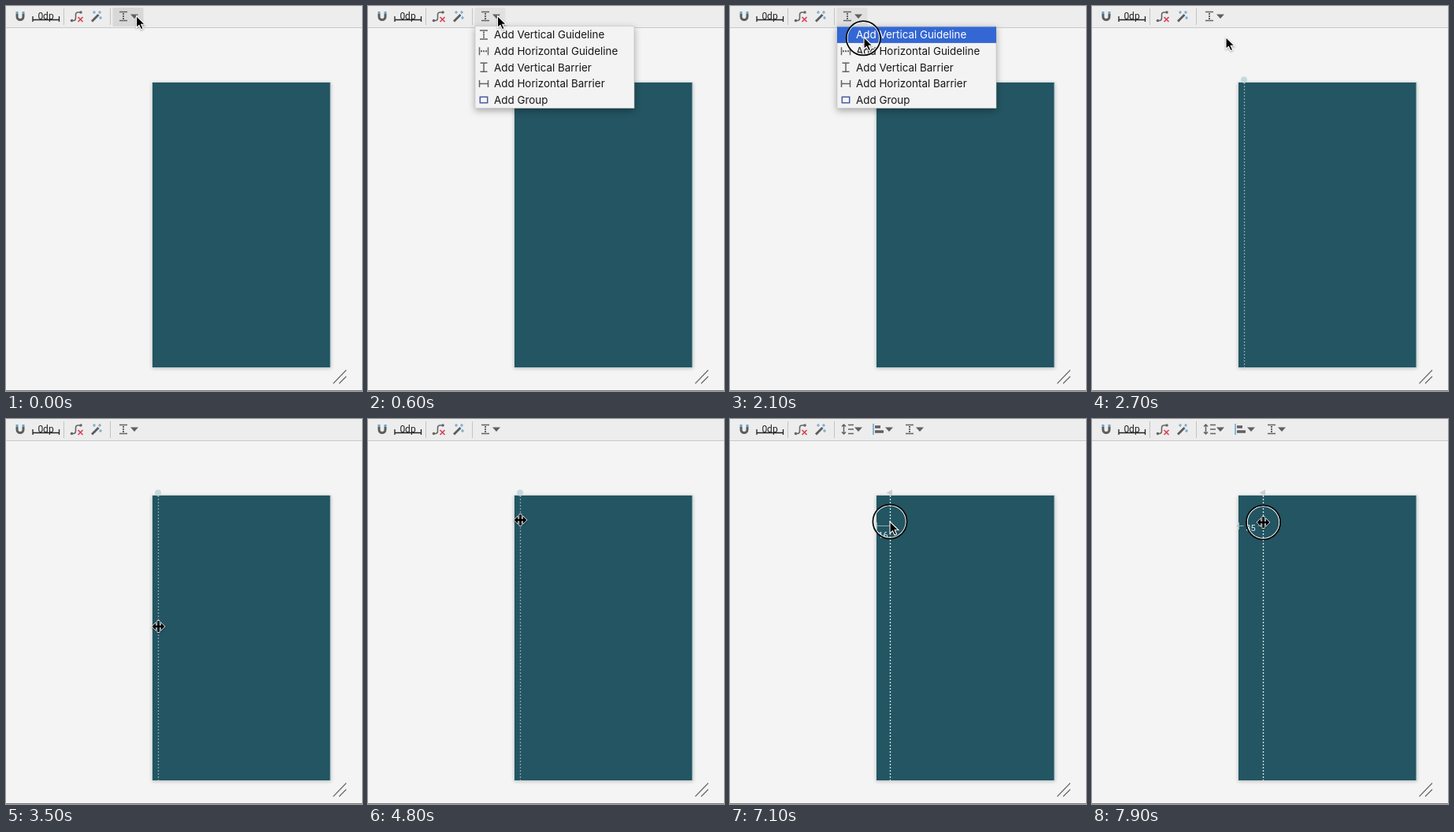
An HTML page that plays this animation: 452 px wide and 488 px high, repeating every 8 s.

```html
<!DOCTYPE html>
<html lang="en">
<head>
<meta charset="utf-8">
<title>Adding a vertical guideline</title>
<style>
  html, body { margin: 0; width: 100%; height: 100%; overflow: hidden; background: #f4f4f4; }
  svg { display: block; width: 452px; height: 488px; }
  .dp { font: 12px Roboto, sans-serif; fill: #222; }
  .item { font: 13.4px Inter, sans-serif; fill: #161616; }
  .on { fill: #fff; }
  #value { font: 11px Roboto, sans-serif; fill: #e3ecee; }
  .shade { filter: drop-shadow(0 3px 4px rgba(0, 0, 0, .32)); }
  .ink { fill: none; stroke: #636363; stroke-width: 1.5; }
</style>
</head>
<body>
<svg viewBox="0 0 452 488">
  <defs>
    <path id="tri" d="M-5 -2.6H5L0 3Z" fill="#606060"/>
    <g id="vguide" class="ink">
      <path d="M-5 -5.5H5M-5 5.5H5"/>
      <path d="M0 -4V4" stroke-width="2" stroke-dasharray="2 1"/>
    </g>
    <g id="vbar" class="ink"><path d="M-4.5 -5.5H4.5M-4.5 5.5H4.5M0 -5V5"/></g>
    <g id="group"><rect x="-4.7" y="-3.7" width="9.4" height="7.4" fill="#f4f6fc" stroke="#4a5a9c" stroke-width="1.5"/></g>
  </defs>

  <rect width="452" height="488" fill="#f4f4f4"/>
  <rect width="452" height="27" fill="#ededed"/>
  <path d="M0 27.5H452" stroke="#c9c9c9"/>
  <path d="M0 487.5H452" stroke="#777"/>

  <!-- toolbar -->
  <rect id="button" x="135.5" y="2" width="39" height="24" rx="1.5"/>
  <path d="M14 10V13.5a4 4 0 0 0 8 0V10" fill="none" stroke="#5d5d5d" stroke-width="3"/>
  <path d="M14 7V10M22 7V10" stroke="#62a5cf" stroke-width="3"/>
  <text class="dp" x="50.5" y="16.5" text-anchor="middle">0dp</text>
  <path d="M34 13V20M67.5 13V20M34 17.5H67.5" fill="none" stroke="#222" stroke-width="1.3"/>
  <path d="M73.5 3V24M132.5 3V24" stroke="#c3c3c3"/>
  <path d="M82 18.5H85.5Q88.5 18.5 88.5 15V11Q88.5 8 91.5 8H96" fill="none" stroke="#666" stroke-width="1.6"/>
  <circle cx="83.5" cy="18.5" r="1.8" fill="#666"/><circle cx="95" cy="8" r="1.8" fill="#666"/>
  <path d="M91.5 14L97.5 20M97.5 14L91.5 20" stroke="#dd4055" stroke-width="1.7"/>
  <path d="M109 19.5L117.5 11" stroke="#5d5d5d" stroke-width="2.8"/>
  <path d="M112 6V10M110 8H114M120 13V17M118 15H122M119 6V10M117 8H121" stroke="#6aa3cc" stroke-width="1.2"/>
  <g id="basic">
    <use href="#vguide" x="149" y="13"/><use href="#tri" x="163" y="13"/>
  </g>
  <g id="extra">
    <path class="ink" d="M150 7.5H157M150 13H157M150 18.5H157M144.5 7V19M142 9.5L144.5 7L147 9.5M142 16.5L144.5 19L147 16.5"/>
    <use href="#tri" x="163" y="13"/>
    <path d="M182 6V20" stroke="#65a5cc" stroke-width="1.5"/>
    <path d="M184 10H191M184 16H195" stroke="#606060" stroke-width="3.6"/>
    <use href="#tri" x="202" y="13"/>
    <use href="#vguide" x="228" y="13"/><use href="#tri" x="241" y="13"/>
  </g>

  <!-- blueprint -->
  <rect x="185.5" y="96.5" width="227" height="362" fill="#bfd6da" style="filter:drop-shadow(0 1px 2px rgba(0,0,0,.22))"/>
  <rect x="186" y="97" width="225.5" height="361" fill="#235562"/>
  <path d="M415.5 478.5L432 461.5M423 478.5L432 469.5" stroke="#666" stroke-width="1.1"/>

  <g id="guide">
    <path id="line" d="M.5 97V458" stroke-width="1.3" stroke-dasharray="2 2"/>
    <circle id="knob" cy="93.5" r="4" fill="#c6dadd"/>
    <path id="arrow" d="M-4.5 93.5L3 89.5V97Z" fill="#cbcfd0"/>
  </g>
  <g id="measure">
    <path id="span" fill="none" stroke="#8fb0ad" stroke-width="1"/>
    <text id="value" text-anchor="middle"></text>
  </g>

  <g id="menu">
    <rect class="shade" x="136" y="25.5" width="202" height="104" fill="#f3f3f3" stroke="#c4c4c4" stroke-width=".6"/>
    <rect id="mark" x="136" width="202" height="20.6" fill="#3467d3"/>
    <g id="rows"></g>
  </g>

  <!-- pointers -->
  <g id="ring" fill="none">
    <circle r="20.4" stroke="#fff" stroke-width="1.3"/>
    <circle r="21.6" stroke="#080808" stroke-width="1.8"/>
  </g>
  <path id="pointer" d="M0 0V15L3.5 11.8L6 17.2L8.6 16L6.2 10.8H11Z" fill="#000" stroke="#fff" stroke-width="1.1"
    style="filter:drop-shadow(0 1px 1px rgba(0,0,0,.35))"/>
  <path id="resize" d="M-8 0L-3.5 -4.5V-1.5H-1.2V-7H1.2V-1.5H3.5V-4.5L8 0L3.5 4.5V1.5H1.2V7H-1.2V1.5H-3.5V4.5Z"
    fill="#000" stroke="#fff" stroke-width="1.3" style="paint-order:stroke;filter:drop-shadow(0 1px 1px rgba(0,0,0,.35))"/>
</svg>
<script>
const LOOP = 8000, STEP = 100;
const ROW_TOP = 26.3, ROW_H = 20.6, EDGE = 186;
const el = id => document.getElementById(id);

const items = [
  ['Add Vertical Guideline', 'vguide', 0],
  ['Add Horizontal Guideline', 'vguide', 90],
  ['Add Vertical Barrier', 'vbar', 0],
  ['Add Horizontal Barrier', 'vbar', 90],
  ['Add Group', 'group', 0]
];
el('rows').innerHTML = items.map(([label, icon, turn], i) => {
  const y = ROW_TOP + ROW_H * (i + .5);
  return `<g><use href="#${icon}" transform="translate(147 ${y}) rotate(${turn})"/>` +
    `<text class="item" x="160" y="${y + 4.8}">${label}</text></g>`;
}).join('');
const rows = [...el('rows').children];

// time, x, y
const pointerPath = [
  [0, 165.5, 12.5], [200, 164.5, 12.5], [1200, 164.5, 12.5], [1500, 168, 72],
  [1800, 170, 39.5], [3000, 170, 39.5], [3500, 193.5, 263], [3800, 193.5, 247],
  [4500, 193.5, 136], [4600, 193.5, 136], [4800, 193.5, 128], [5900, 193.5, 128],
  [6100, 195.5, 128.5], [6200, 195.5, 128.5], [6700, 203, 130], [7200, 203, 130], [7900, 217.5, 131]
];
const guidePath = [[6200, 193], [6700, 203], [7200, 203], [7900, 217]];
const valuePath = [[6200, 11], [6700, 16], [7200, 16], [7900, 35]];

function at(path, t, k = 1) {
  let i = 0;
  while (i < path.length - 1 && path[i + 1][0] <= t) i++;
  const a = path[i], b = path[i + 1];
  if (!b || t <= a[0]) return a[k];
  return a[k] + (b[k] - a[k]) * (t - a[0]) / (b[0] - a[0]);
}
const show = (id, on) => el(id).setAttribute('visibility', on ? 'visible' : 'hidden');
const move = (id, x, y) => el(id).setAttribute('transform', `translate(${x} ${y})`);

function drawMenu(t, y) {
  const open = t >= 400 && t < 2300;
  show('menu', open);
  show('button', t < 2300);
  el('button').setAttribute('fill', t < 400 ? '#d8d8d8' : '#e1e1e1');
  const row = open && y > ROW_TOP ? Math.floor((y - ROW_TOP) / ROW_H) : -1;
  el('mark').setAttribute('y', ROW_TOP + Math.max(row, 0) * ROW_H);
  el('mark').setAttribute('opacity', row < 0 ? 0 : 1);
  rows.forEach((r, i) => {
    r.firstChild.setAttribute('opacity', i === row ? 0 : 1);
    r.lastChild.classList.toggle('on', i === row);
  });
}

function drawGuide(t) {
  const x = at(guidePath, t), dragged = t >= 6300;
  show('guide', t >= 2700);
  move('guide', x, 0);
  el('line').setAttribute('stroke', dragged ? '#d9e6e8' : '#86a8af');
  el('knob').setAttribute('opacity', dragged ? 0 : 1);
  el('arrow').setAttribute('opacity', dragged ? 1 : 0);

  show('measure', dragged);
  const mid = (EDGE + x) / 2, wide = x - EDGE > 26;
  el('span').setAttribute('d', `M${EDGE}.5 131V140` + (wide
    ? `M${EDGE - 2} 135.5H${mid - 9}M${mid + 9} 135.5H${x}` : `M${EDGE} 135.5H${x}`));
  el('value').textContent = Math.round(at(valuePath, t));
  el('value').setAttribute('x', mid);
  el('value').setAttribute('y', wide ? 141.5 : 151);
}

function render(t) {
  const x = at(pointerPath, t), y = at(pointerPath, t, 2);
  drawMenu(t, y);
  drawGuide(t);
  show('basic', t < 7000);
  show('extra', t >= 7000);

  const sizing = t >= 3500 && !(t >= 7000 && t < 7300);
  show('pointer', !sizing);
  show('resize', sizing);
  move('pointer', x, y);
  move('resize', x, y);
  show('ring', (t >= 2100 && t < 2300) || t >= 5700);
  move('ring', x - (t < 3000 ? .7 : 0), y + (t < 3000 ? 1.3 : 0));
}

const start = performance.now();
function tick() {
  const t = (performance.now() - start) % LOOP;
  render(Math.floor(t / STEP) * STEP);
  requestAnimationFrame(tick);
}
tick();
</script>
</body>
</html>
```
